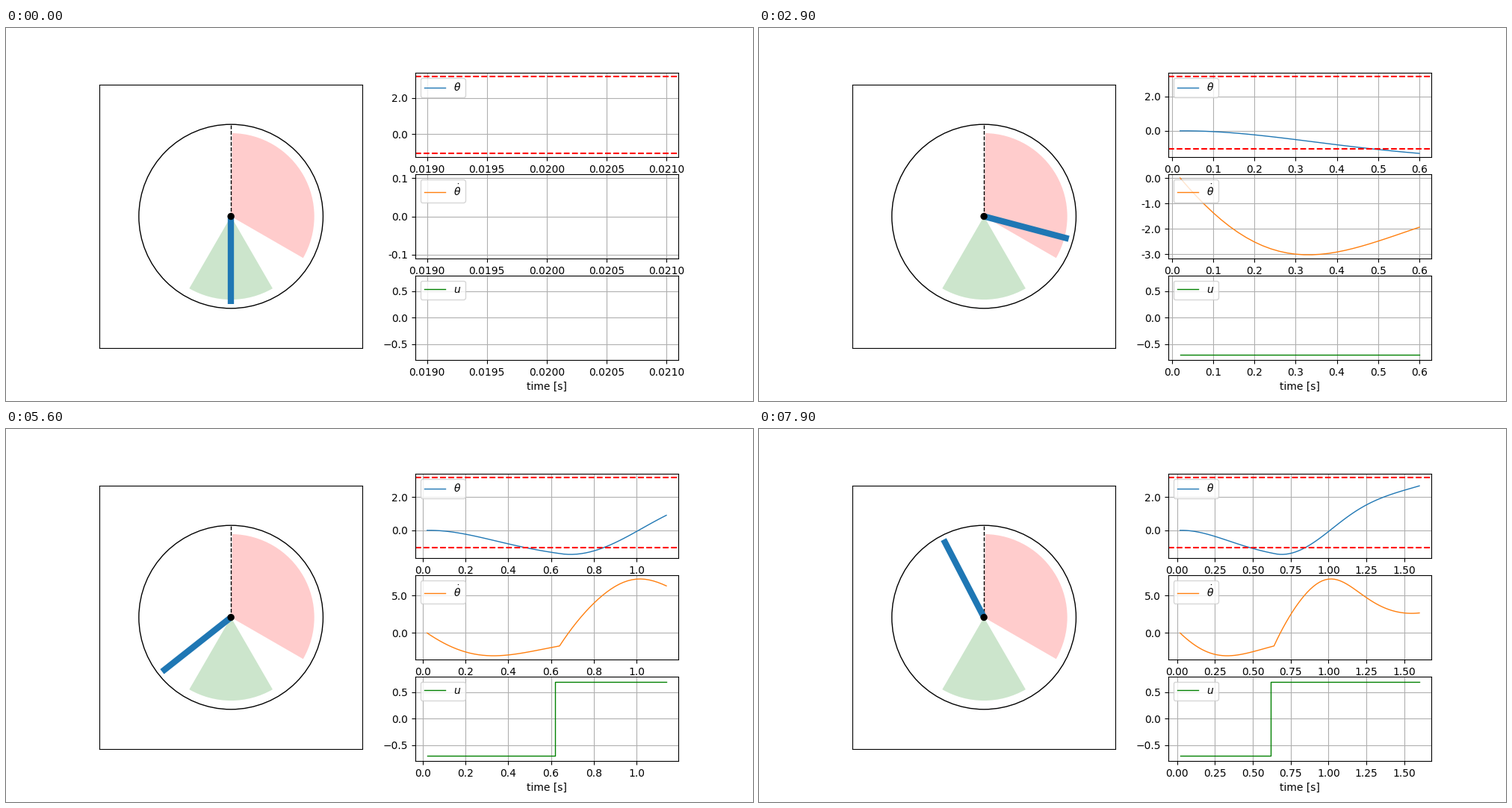
Write a matplotlib script that moves like this. It is 1000 by 500 pixels and loops after 8000 ms.

```python
import numpy as np
import matplotlib.pyplot as plt
from matplotlib.animation import FuncAnimation
from matplotlib.patches import Circle, Wedge
from matplotlib.ticker import FormatStrFormatter

STEPS, DT = 80, 0.02
MASS, LENGTH, DAMPING, GRAVITY = 0.15, 0.5, 0.1, 9.81
U_MAX, T_SWITCH = 0.7, 0.63
TH_MIN, TH_MAX = np.radians([-60, 181])


def simulate():
    """Damped pendulum under bang-bang torque, explicit Euler steps."""
    time = DT * np.arange(1, STEPS + 1)
    torque = np.where(time < T_SWITCH, -U_MAX, U_MAX)
    theta, omega = np.zeros(STEPS), np.zeros(STEPS)
    inertia = MASS * LENGTH ** 2
    for k in range(STEPS - 1):
        acc = (-GRAVITY / LENGTH * np.sin(theta[k])
               + (torque[k] - DAMPING * omega[k]) / inertia)
        theta[k + 1] = theta[k] + DT * omega[k]
        omega[k + 1] = omega[k] + DT * acc
    return time, theta, omega, torque


def make_plot(row, label, color, **style):
    ax = fig.add_subplot(3, 2, 2 * row)
    line, = ax.plot([], [], color=color, lw=1, label=label, **style)
    ax.grid(True)
    ax.legend(loc="upper left")
    return ax, line


def make_scene():
    ax = fig.add_subplot(1, 2, 1, aspect="equal")
    ax.set(xlim=(-1.5, 1.5), ylim=(-1.5, 1.5), xticks=[], yticks=[])
    ax.add_patch(Wedge((0, 0), 0.95, -30, 89, color="r", alpha=0.2, lw=0))
    ax.add_patch(Wedge((0, 0), 0.95, -120, -60, color="g", alpha=0.2, lw=0))
    ax.add_patch(Circle((0, 0), 1.05, fill=False, ec="k", lw=1))
    ax.plot([0, 0], [0, 1.05], "k--", lw=1)
    rod, = ax.plot([], [], color="C0", lw=6, solid_capstyle="butt")
    ax.add_patch(Circle((0, 0), 0.04, fc="k", lw=0, zorder=3))
    return rod


time, theta, omega, torque = simulate()

fig = plt.figure(figsize=(10, 5), dpi=100)
rod = make_scene()
ax_th, line_th = make_plot(1, r"$\theta$", "C0")
ax_om, line_om = make_plot(2, r"$\dot{\theta}$", "C1")
ax_u, line_u = make_plot(3, r"$u$", "g", drawstyle="steps-pre")

for limit in (TH_MIN, TH_MAX):
    ax_th.axhline(limit, color="r", ls="--")
for ax in (ax_th, ax_om):
    ax.yaxis.set_major_formatter(FormatStrFormatter("%.1f"))
ax_u.set_ylim(-0.8, 0.8)
ax_u.set_xlabel("time [s]")

curves = [(ax_th, line_th, theta), (ax_om, line_om, omega),
          (ax_u, line_u, torque)]


def update(i):
    rod.set_data([0, -np.sin(theta[i])], [0, -np.cos(theta[i])])
    for ax, line, values in curves:
        line.set_data(time[:i + 1], values[:i + 1])
        ax.relim()
        ax.autoscale_view()
    return [rod, line_th, line_om, line_u]


anim = FuncAnimation(fig, update, frames=STEPS, interval=100,
                     repeat=True, repeat_delay=0, blit=False)
plt.show()
```
